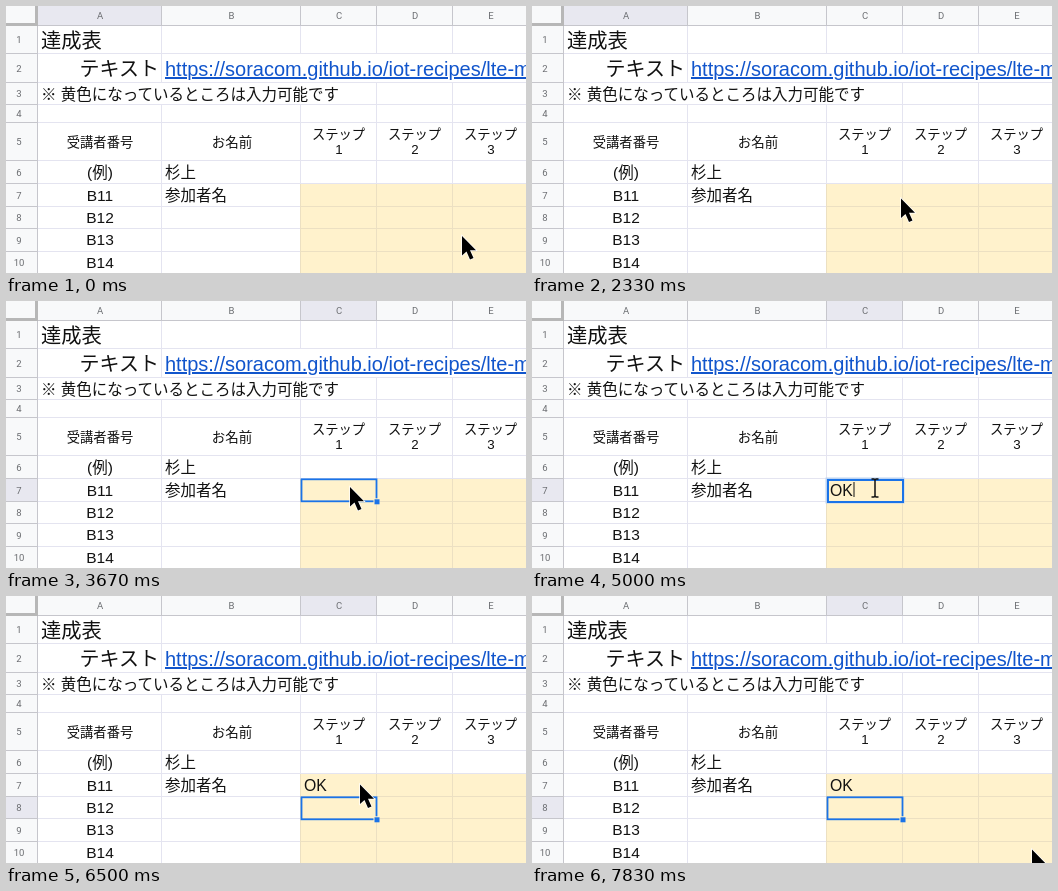
An HTML page that plays this animation: 520x267 px, repeating every 8 s.

```html
<!DOCTYPE html>
<html lang="ja">
<head>
<meta charset="utf-8">
<style>
html, body { margin: 0; width: 100%; height: 100%; overflow: hidden; background: #fff; }
svg { display: block; width: 520px; height: 267px; }
text { font-family: "Liberation Sans", Arial, "Noto Sans CJK JP", "Noto Sans CJK", sans-serif; fill: #111; white-space: pre; }
.head { font-family: Roboto, sans-serif; font-size: 9.5px; fill: #6a6c70; text-anchor: middle; }
.mid { text-anchor: middle; }
.end { text-anchor: end; }
</style>
</head>
<body>
<svg id="stage" viewBox="0 0 520 267"></svg>
<script>
const NS = 'http://www.w3.org/2000/svg';
const stage = document.getElementById('stage');
const LOOP = 8000, STEP = 1000 / 6;
const GRID = '#e4e4f0', CREAM = '#fff2cc', CREAM_GRID = '#ece0c2', BLUE = '#1a73e8';
const HEAD = '#f8f9fa', HEAD_ON = '#e8e8f0', HEAD_LINE = '#c6c6cc', CORNER = '#b7b7b7';
const cols = [32, 156, 295, 371, 447, 523];
const rows = [20, 48, 77, 99, 117, 155, 178, 201, 223, 246, 269];

function add(tag, attrs, parent = stage) {
  const el = document.createElementNS(NS, tag);
  for (const k in attrs) el.setAttribute(k, attrs[k]);
  return parent.appendChild(el);
}
const box = (x, y, width, height, fill, parent) => add('rect', { x, y, width, height, fill }, parent);
function label(str, x, y, size, cls = '', more = {}) {
  const el = add('text', { x, y, 'font-size': size, class: cls, ...more });
  el.textContent = str;
  return el;
}
const show = (el, on) => el.setAttribute('visibility', on ? 'visible' : 'hidden');
const place = (el, x, y) => el.setAttribute('transform', `translate(${x.toFixed(1)} ${y.toFixed(1)})`);

// Cells and grid; long text hides the lines it runs across
box(0, 0, 520, 267, '#fff');
box(295, 178, 225, 89, CREAM);
const overflow = { 1: [2, 3, 4], 2: [1, 2] };
for (let r = 0; r < 10; r++) {
  const cream = r >= 6;
  box(32, rows[r + 1] - 1, 488, 1, GRID);
  if (cream) box(295, rows[r + 1] - 1, 225, 1, CREAM_GRID);
  for (let c = 1; c < 5; c++) {
    if ((overflow[r] || []).includes(c)) continue;
    box(cols[c] - 1, rows[r], 1, rows[r + 1] - rows[r], cream && c > 1 ? CREAM_GRID : GRID);
  }
}

// Headers
box(0, 0, 520, 20, HEAD);
box(0, 0, 32, 267, HEAD);
const colMark = box(0, 0, 10, 19, HEAD_ON);
const rowMark = box(0, 0, 31, 10, HEAD_ON);
for (let c = 0; c < 5; c++) {
  box(cols[c] - 1, 0, 1, 20, HEAD_LINE);
  label('ABCDE'[c], (cols[c] + cols[c + 1]) / 2, 13, 9.5, 'head');
}
for (let r = 0; r < 10; r++) {
  box(0, rows[r + 1] - 1, 32, 1, HEAD_LINE);
  label(r + 1, 13, (rows[r] + Math.min(rows[r + 1], 268)) / 2 + 3, 9.5, 'head');
}
box(0, 19, 520, 1, HEAD_LINE);
box(31, 0, 1, 267, HEAD_LINE);
box(0, 17, 32, 3, CORNER);
box(29, 0, 3, 20, CORNER);

// Sheet contents
label('達成表', 35, 42, 20.3);
label('テキスト', 153, 70, 20, 'end');
label('https://soracom.github.io/iot-recipes/lte-m', 159, 70, 20, '',
  { style: 'fill:#1155cc;text-decoration:underline' });
label('※ 黄色になっているところは入力可能です', 35, 94, 15.5);
label('受講者番号', 94, 141, 13.3, 'mid');
label('お名前', 226, 141, 13.5, 'mid');
for (let i = 0; i < 3; i++) {
  label('ステップ', 332.5 + 76 * i, 133, 13.3, 'mid');
  label(i + 1, 333 + 76 * i, 148, 13.3, 'mid');
}
label('(例)', 94, 172, 15.5, 'mid');
label('杉上', 159, 172, 15.5);
label('参加者名', 159, 194.5, 15.5);
for (let i = 0; i < 4; i++) label('B1' + (i + 1), 94, 194.5 + 22.4 * i, 15.5, 'mid');

// Selection, editor and pointers
const editor = add('g', {});
add('rect', { x: 294.5, y: 177.5, width: 77, height: 24, fill: 'none', stroke: '#bcd3f2', 'stroke-width': 2 }, editor);
add('rect', { x: 296, y: 179, width: 75, height: 22, fill: CREAM, stroke: BLUE, 'stroke-width': 2 }, editor);
const select = add('g', {});
add('rect', { x: 295.5, y: 0, width: 75, height: 22, fill: 'none', stroke: BLUE, 'stroke-width': 1.8 }, select);
box(367.5, 19, 6, 6, CREAM, select);
box(368.5, 20, 5, 5, BLUE, select);
const typed = label('', 298, 194.5, 15.8);
const caret = box(322, 181, 1, 15, '#111');
const beam = add('path', {
  d: 'M-3.5 -9H-1L0 -8L1 -9H3.5M0 -8V8M-3.5 9H-1L0 8L1 9H3.5',
  fill: 'none', stroke: '#111', 'stroke-width': 1.5
});
const arrow = add('path', {
  d: 'M0 0V19.5L4.5 15.5L8 23.5L11.5 22L8 14.3H14Z',
  fill: '#000', stroke: '#fff', 'stroke-width': 1.4, 'paint-order': 'stroke'
});

// Pointer path: time, x, y
const path = [
  [0, 456, 230], [1583, 456, 230], [2333, 369, 192.5], [2667, 344, 186],
  [6367, 344, 186], [6500, 354, 188.5], [7200, 500, 253.5], [LOOP, 500, 253.5]
];
// Speed at a point: zero beside a rest, else the mean over its neighbours
function speed(i, k) {
  const a = path[i - 1], b = path[i], c = path[i + 1];
  if (!a || !c || a[k] === b[k] || b[k] === c[k]) return 0;
  return (c[k] - a[k]) / (c[0] - a[0]);
}
function pointer(t) {
  const i = Math.max(1, path.findIndex(p => p[0] >= t));
  const a = path[i - 1], b = path[i], d = b[0] - a[0], u = (t - a[0]) / d, v = 1 - u;
  return [1, 2].map(k =>
    a[k] + (b[k] - a[k]) * u * u * (3 - 2 * u) +
    d * u * v * (v * speed(i - 1, k) - u * speed(i, k)));
}

const CLICK = 2830, EDIT = 4330, KEY_K = 4500, ENTER = 5330;
function draw(now) {
  const t = Math.floor((now % LOOP + 4) / STEP) * STEP % LOOP;
  const chosen = t >= CLICK, editing = t >= EDIT && t < ENTER, done = t >= ENTER;
  const c = chosen ? 2 : 0, r = done ? 7 : 6;

  colMark.setAttribute('x', cols[c]);
  colMark.setAttribute('width', cols[c + 1] - cols[c] - 1);
  rowMark.setAttribute('y', rows[r]);
  rowMark.setAttribute('height', rows[r + 1] - rows[r] - 1);
  show(rowMark, chosen);

  show(select, chosen && !editing);
  place(select, 0, rows[r] + 0.3);
  show(editor, editing);
  show(caret, editing);
  caret.setAttribute('x', t >= KEY_K ? 321.5 : 311);
  typed.textContent = t < EDIT ? '' : t < KEY_K ? 'O' : 'OK';

  show(arrow, !editing);
  show(beam, editing);
  place(arrow, ...pointer(t));
  place(beam, 343, 187);
}

function tick() {
  draw(performance.now());
  requestAnimationFrame(tick);
}
tick();
</script>
</body>
</html>
```
